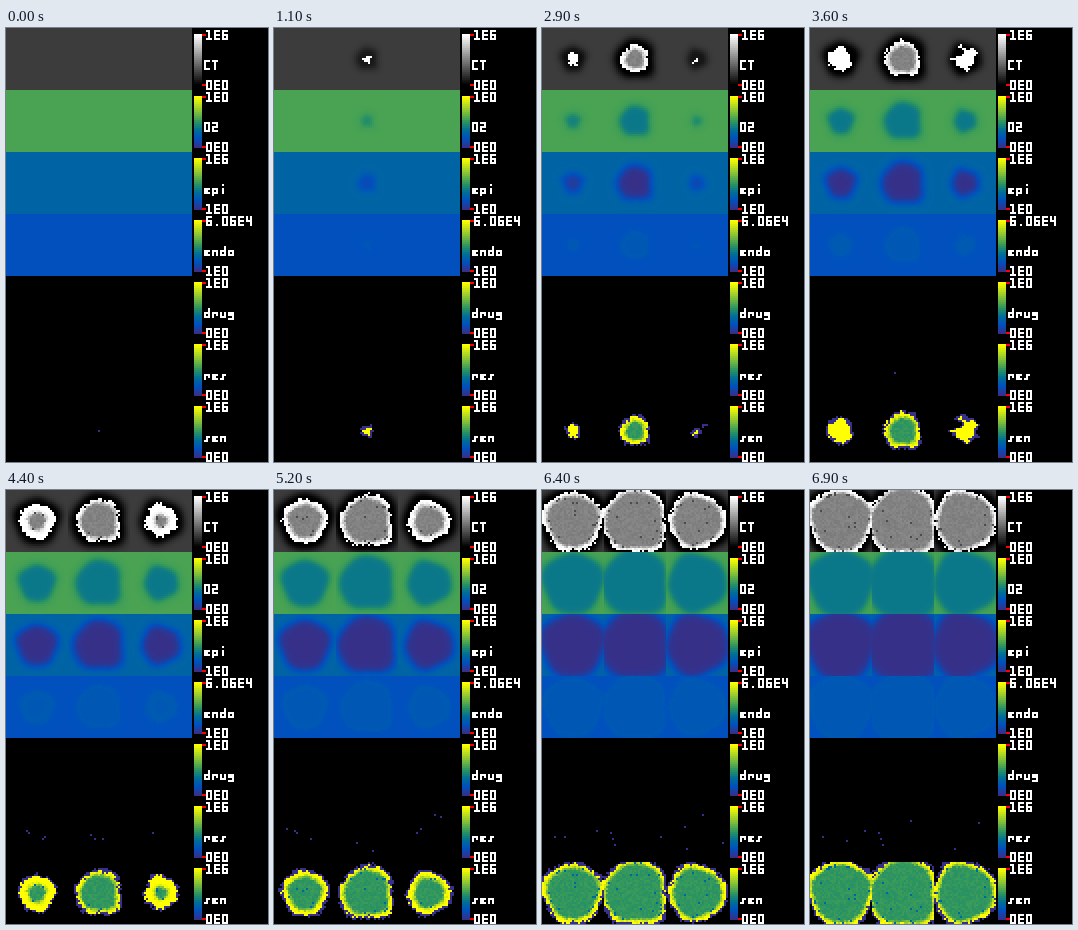
An HTML page with a canvas that plays this animation: 262 by 434 pixels, repeating every 7000 ms.

```html
<!DOCTYPE html>
<html lang="en">
<head>
<meta charset="utf-8">
<title>Growth panels</title>
<style>
html, body { margin: 0; width: 100%; height: 100%; overflow: hidden; background: #000; }
canvas, svg { position: absolute; left: 0; top: 0; display: block; }
canvas { width: 186px; height: 434px; image-rendering: pixelated; }
</style>
</head>
<body>
<canvas id="grid" width="93" height="217"></canvas>
<svg id="legend" width="262" height="434" viewBox="0 0 262 434" shape-rendering="crispEdges"></svg>
<script>
const LOOP = 7000, STEP = 100, TILE = 31, COLS = 93, ROWS = 217;

const NAVY = [54, 48, 137], BLUE = [0, 80, 190], TEAL = [0, 110, 152],
  GREEN = [44, 148, 96], YELLOW = [255, 255, 0];

const PANELS = [
  ['CT', '1E6', '0E0'], ['O2', '1E0', '0E0'], ['epi', '1E6', '1E0'],
  ['endo', '6.06E4', '1E0'], ['drug', '1E0', '0E0'], ['res', '1E6', '0E0'],
  ['sen', '1E6', '0E0']
];

// Stroke font on a 3 x 5 grid
const GLYPHS = {
  0: 'M0 0H2V4H0Z', 1: 'M0 0H1V4M0 4H2', 2: 'M0 0H2V2H0V4H2', 4: 'M0 0V2H2M2 0V4',
  6: 'M2 0H0V4H2V2H0', E: 'M2 0H0V4H2M0 2H2', C: 'M2 0H0V4H2', T: 'M0 0H2M1 0V4',
  O: 'M0 0H2V4H0Z', '.': 'M1 4h0', e: 'M0 2H2M0 3H1M0 4H2',
  p: 'M0 5V2H2V4H0', i: 'M1 0h0M1 2V4', n: 'M0 4V2H2V4', d: 'M2 0V4H0V2H2',
  o: 'M0 2H2V4H0Z', r: 'M0 4V2H2V3', u: 'M0 2V4H2V2', g: 'M2 2H0V3H2V5H0',
  s: 'M2 2H1V4H0'
};

// Times in seconds: "lag" offsets the linear growth, "born" its slow start,
// "field" the diffuse halo and "ripe" the moment the core begins to form
const COLONIES = [
  { speed: 6, lag: 1.1, born: 2.1, field: 1.4, ripe: 3.6, norm: 2, rough: 3 },
  { speed: 5.2, lag: -.08, born: -9, field: 0, ripe: .6, norm: 2.5, rough: 0 },
  { speed: 6, lag: 1.3, born: 2.4, field: 1.7, ripe: 3.8, norm: 2, rough: 12 }
];

const clamp = (v, a = 0, b = 1) => Math.min(b, Math.max(a, v));
const mix = (a, b, k) => a + (b - a) * k;
const blend = (a, b, k) => a.map((v, i) => mix(v, b[i], k));
const sigmoid = x => 1 / (1 + Math.exp(-x));
const gray = v => [v, v, v];

function heat(value) {
  const v = clamp(value) * 6;
  if (v < 1) return blend(NAVY, BLUE, v);
  if (v < 2) return blend(BLUE, TEAL, v - 1);
  if (v < 3) return blend(TEAL, GREEN, v - 2);
  return blend(GREEN, YELLOW, (v - 3) / 3);
}

function rand(x, y, seed) {
  let h = Math.imul(x + 101, 374761393) ^ Math.imul(y + 57, 668265263) ^ Math.imul(seed + 1, 974634541);
  h = Math.imul(h ^ (h >>> 13), 1274126177);
  return ((h ^ (h >>> 16)) >>> 0) / 4294967296;
}

// Bilinear noise in patches three cells wide
function patch(x, y, seed) {
  const u = x / 3, v = y / 3, i = Math.floor(u), j = Math.floor(v);
  const top = mix(rand(i, j, seed), rand(i + 1, j, seed), u - i);
  const low = mix(rand(i, j + 1, seed), rand(i + 1, j + 1, seed), u - i);
  return mix(top, low, v - j);
}

// Outer radius in px
function edgeAt(c, t) {
  if (t < c.born) return -2;
  return c.speed * (t - c.lag) * (1 - Math.exp((c.born - t) / .6));
}

function colonyAt(c, t) {
  const edge = edgeAt(c, t);
  return {
    edge,
    core: edge - 4.6 - 12 * Math.exp((c.ripe - t) / .9),
    rough: c.rough * clamp(4.6 - t),
    field: clamp((t - c.field) / 1.9)
  };
}

const cells = [];
for (let y = 0; y < TILE; y++) {
  for (let x = 0; x < COLS; x++) {
    const k = Math.floor(x / TILE), dx = x % TILE - 15, dy = y - 15;
    const p = COLONIES[k].norm, a = Math.atan2(dy, dx);
    const wobble = 1 + .045 * Math.sin(3 * a + 2.35 * k) + .03 * Math.sin(5 * a + k);
    const dist = 2 * (Math.abs(dx) ** p + Math.abs(dy) ** p) ** (1 / p) * wobble;
    const soft = clamp(dist / 8), blot = patch(x, y, 4);
    cells.push({
      x, y, k, dist, blot,
      out: dist + soft * (2.4 * rand(x, y, 1) + 3 * blot - 2.7),
      mid: dist + soft * (2 * rand(x, y, 2) - 1),
      rim: 1.4 + 1.8 * rand(x, y, 3)
    });
  }
}

// Short-lived single cells that appear inside the colonies
const specks = Array.from({ length: 30 }, (_, n) => {
  const r = i => rand(n, i, 7), k = Math.floor(r(0) * 3), born = 3.5 + n * .11;
  const reach = Math.min(28, edgeAt(COLONIES[k], born)) * (.4 + .6 * r(1)) / 2;
  const a = r(2) * 2 * Math.PI;
  return {
    born, dies: born + .5 + r(3),
    x: Math.round(k * TILE + 15 + reach * Math.cos(a)),
    y: Math.round(5 * TILE + 15 + reach * Math.sin(a))
  };
});

const ctx = document.getElementById('grid').getContext('2d');
const image = ctx.createImageData(COLS, ROWS);

function put(x, y, rgb) {
  const i = (y * COLS + x) * 4;
  for (let c = 0; c < 3; c++) image.data[i + c] = rgb[c];
}

// Density of a cell: -1 empty, 0 frontier, up to 1 dense
function density(cell, s, t, frame) {
  const d = cell.out + s.rough * (cell.blot - .4);
  if (d >= s.edge) return -1;
  if (d >= s.edge - cell.rim) return 0;
  const depth = s.core - cell.mid;
  if (depth <= 0) return 1 - .15 * rand(cell.x, cell.y, 5) * clamp(1 + depth / 3);
  const holes = (depth < 3 ? .08 : .012) * clamp((t - 4) / 1.5);
  if (rand(cell.x, cell.y, 10 + (frame >> 1)) < holes) return .3;
  return 1 - .49 * clamp((depth + 1) / 4) + .06 * (rand(cell.x, cell.y, 200 + frame) - .5);
}

function draw(frame) {
  const t = frame * STEP / 1000;
  const state = COLONIES.map(c => colonyAt(c, t));
  image.data.fill(0);
  for (let i = 3; i < image.data.length; i += 4) image.data[i] = 255;

  for (const cell of cells) {
    const { x, y, k, dist } = cell, s = state[k];
    const v = density(cell, s, t, frame);
    const gap = Math.max(0, dist - s.edge + 1);
    const halo = s.field * Math.exp(-((gap / 6.5) ** 2));
    const inside = s.field * sigmoid((s.edge - 1.5 - dist) / 1.5);
    const wide = s.field * sigmoid((s.edge + .5 - dist) / 2.2);
    put(x, y, gray(v > 0 ? 255 * v : 60 * (1 - halo)));
    put(x, y + TILE, heat(.57 - .17 * inside - .025 * halo));
    put(x, y + 2 * TILE, heat(.28 - .24 * wide - .04 * halo));
    put(x, y + 3 * TILE, heat(.165 + .045 * inside + (v > .8 ? .012 : 0)));
    if (v >= 0) put(x, y + 6 * TILE, heat(v));
  }
  for (const { born, dies, x, y } of specks) {
    if (t >= born && t < dies) put(x, y, NAVY);
  }
  ctx.putImageData(image, 0, 0);
}

function label(text, x, y) {
  const glyphs = [...text].map((ch, i) =>
    `<path d="${GLYPHS[ch]}" transform="translate(${i * 4 + .5} .5)"/>`).join('');
  return `<g role="img" aria-label="${text}" transform="translate(${x} ${y}) scale(2)" fill="none"
    stroke="#fff" stroke-linecap="square">${glyphs}</g>`;
}

function bar(y, color) {
  let out = '';
  for (let i = 0; i < 26; i++) {
    out += `<rect x="188" y="${y + 2 * i}" width="8" height="2" fill="rgb(${color(1 - i / 25)})"/>`;
  }
  return out;
}

document.getElementById('legend').innerHTML = PANELS.map(([name, max, min], i) => {
  const y = i * 62;
  return bar(y + 6, i ? heat : v => gray(255 * v))
    + `<path d="M196 ${y + 7}h4m-4 50h4" stroke="#f00" stroke-width="2"/>`
    + label(max, 200, y + 2) + label(name, 198, y + 32) + label(min, 200, y + 52);
}).join('');

const start = performance.now();
let last = -1;
function tick() {
  const frame = Math.floor((performance.now() - start) % LOOP / STEP);
  if (frame !== last) draw(frame);
  last = frame;
  requestAnimationFrame(tick);
}
tick();
</script>
</body>
</html>
```
